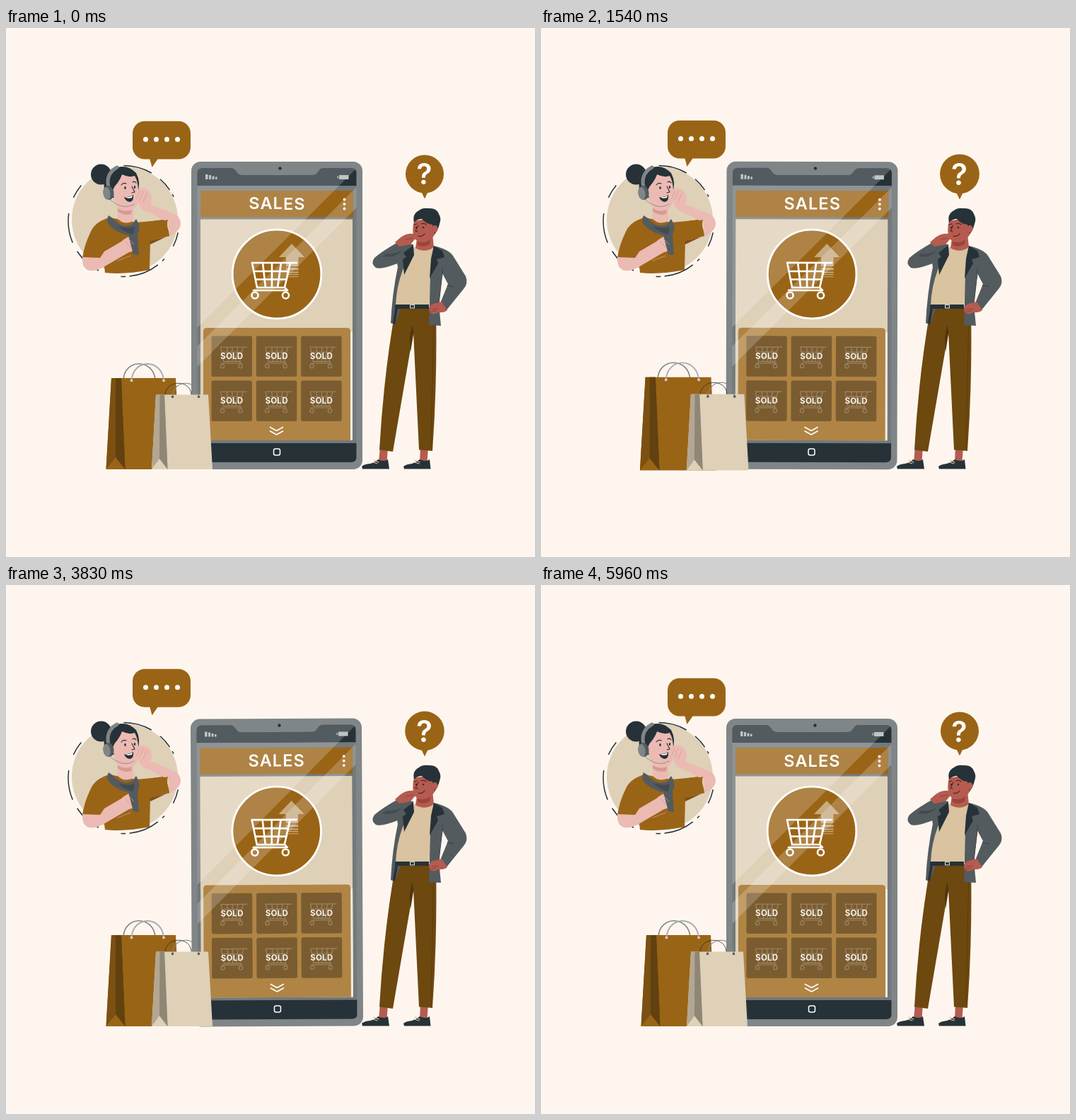
Write an HTML page that moves like this. It is 748 by 748 pixels and loops after 6000 ms.

```html
<!DOCTYPE html>
<html lang="en">
<head>
<meta charset="utf-8">
<title>Sales</title>
<style>
html, body { margin: 0; width: 100%; height: 100%; overflow: hidden; background: #fef6ee; }
svg { display: block; width: 100vw; height: 100vh; }
text { font-family: Inter, "Open Sans", sans-serif; font-weight: 600; fill: #fff; text-anchor: middle; }
.brown { fill: #9a6416; }
.dark { fill: #263238; }
.grey { fill: #535b5f; }
.beige { fill: #dfd0b8; }
.pink { fill: #ebbab3; }
.skin { fill: #b55b50; }
.line { fill: none; stroke-linecap: round; stroke-linejoin: round; }
</style>
</head>
<body>
<svg viewBox="0 0 748 748">
  <defs>
    <g id="cart" class="line">
      <path d="M411 332H348L355 367H394L402 332M350.500 344H399M353 355.500H397M363 332L367 367M376 332V367M389 332L384 367M394 367L398 371H350"/>
      <circle cx="352" cy="378" r="4.500"/><circle cx="395.500" cy="378" r="4.500"/>
    </g>
  </defs>

  <!-- phone -->
  <g id="phone">
    <rect x="262" y="189" width="242" height="435" rx="13" fill="#808587"/>
    <path class="dark" d="M278 198H318Q322 198 325 202L328 206Q330 208 334 208H433Q437 208 439 206L443 201Q445 198 449 198H488Q495.500 198 495.500 205V223H270.500V205Q270.500 198 278 198Z"/>
    <circle class="dark" cx="387.500" cy="198.500" r="2.200"/>
    <path d="M270.500 223H495.500V587H270.500Z" fill="#73797c"/>
    <path class="brown" d="M275 230H491V267.500H275Z"/>
    <path class="beige" d="M275 270.500H490V583H275Z"/>
    <circle class="brown" cx="383" cy="348" r="62.800" stroke="#fff" stroke-width="2.800"/>
    <path d="M404 305L422 324H413.500V337H396V324H386ZM396 339H413.500V342.500H396ZM396 344.500H413.500V346.500H396ZM396 348H413.500V349.300H396ZM396 351.300H413.500V352.300H396Z" fill="#dfd0b8" opacity=".65"/>
    <use href="#cart" stroke="#fff" stroke-width="2.600"/>
    <path d="M487 430H490V583H487Z" fill="#f3ece1"/>
    <path d="M279 583V429Q279 424 284 424H482Q487 424 487 429V583Z" fill="#b08444"/>
    <g id="cards"></g>
    <path class="line" d="M373.500 564.500L382.500 569.500L391.500 564.500M373.500 570L382.500 575L391.500 570" stroke="#fff" stroke-width="1.700"/>
    <path class="dark" d="M270.500 587H495.500V607Q495.500 614 488 614H278Q270.500 614 270.500 607Z"/>
    <rect x="378.500" y="595" width="9" height="9" rx="2.500" fill="none" stroke="#fff" stroke-width="1.500"/>
    <path d="M270.500 205Q270.500 198 278 198H318Q322 198 325 202L328 206Q330 208 334 208H433Q437 208 439 206L443 201Q445 198 449 198H488Q492 198 494 200L270.500 423.500ZM495.500 225V254L270.500 479V450Z" fill="#fff" opacity=".2"/>
    <path d="M282 207H285.500V214H282ZM287 208H290V214H287ZM291.500 209.500H294.500V214H291.500ZM296 210.500H298.500V214H296ZM471 208H484.500V214H471ZM468.500 209.500H470V212.500H468.500Z" fill="#c1c4c5"/>
    <text x="383.500" y="256.500" font-size="23.500" letter-spacing="1.100">SALES</text>
    <g fill="#fff"><circle cx="478.500" cy="242.500" r="1.900"/><circle cx="478.500" cy="249" r="1.900"/><circle cx="478.500" cy="255.500" r="1.900"/></g>
  </g>

  <!-- bags -->
  <g id="bags">
    <path class="line" d="M166 498C167 467 209 467 211 498" stroke="#808587" stroke-width="1.600"/>
    <path class="brown" d="M149 495H240L247 624H141.500Z"/>
    <path d="M149 495H163L168.500 624L155 607L141.500 624Z" fill="#7b5012"/>
    <path d="M155 495H163L168.500 624L155 607Z" fill="#61410f"/>
    <path class="line" d="M177.500 499C179 467 221 467 223 499" stroke="#a6abad" stroke-width="1.800"/>
    <circle cx="177.500" cy="498.500" r="2" fill="#c9cbcc"/><circle cx="223" cy="498.500" r="2" fill="#c9cbcc"/>
    <path class="line" d="M225 518C227 497 261 497 262 518" stroke="#263238" stroke-width=".8"/>
    <path class="beige" d="M212 518.500H286L292 624H206Z"/>
    <path d="M212 518.500H224L228.500 624L217 609L206 624Z" fill="#b3a793"/>
    <path d="M217.500 518.500H224L228.500 624L217 609Z" fill="#8f8675"/>
    <path class="line" d="M235.500 521C237 496 271 496 272.500 521" stroke="#808587" stroke-width="1.100"/>
    <circle class="grey" cx="235.500" cy="521.500" r="1.800"/><circle class="grey" cx="272.500" cy="521.500" r="1.800"/>
  </g>

  <!-- agent -->
  <g>
    <circle class="beige" cx="168" cy="271" r="75"/>
    <circle cx="166.500" cy="273" r="78.500" fill="none" stroke="#263238" stroke-width="1.500" pathLength="360" stroke-dasharray="0 12 15 16 3 6 32 4 5 24 30 10 31 17 15 50 30 11 15 5 3 26"/>
    <path class="brown" d="M146 268Q125 274 119 290Q111 306 108 325L138 329L140 346Q168 349 203 342L204 300L231 294Q226 278 229 271L184 275Z"/>
    <path class="pink" d="M203 295Q234 299 244 285Q251 276 242 265L204 249Q209 238 202 231Q194 224 189 227L187 245Q189 257 200 260L224 272L229 271L232 293Z"/>
    <path class="brown" d="M186 276L222 271Q230 281 231 294L204 301L190 296Z"/>
    <path d="M203 301L226 295.500L204 306Z" fill="#7d5011"/>
    <path class="pink" d="M108 324Q107 338 115 342Q123 346 138 338L174 317Q184 315 186 306Q187 296 179 294Q172 294 163 302L139 316L133 325Z"/>
    <path class="pink" d="M157 244L158 270Q168 280 181 272L179 253Z"/>
    <path d="M158 255Q167 261 178 257L177 263Q166 266 158 259Z" fill="#d79a93"/>
    <path class="grey" d="M145 265Q140 274 148 281Q160 291 173 293L180 320L188 321L186 292Q192 282 184 270L178 278Q164 284 151 269Z"/>
    <path d="M158 280Q173 285 182 281L180 292Q169 290 158 280Z" fill="#434b50"/>
    <circle class="dark" cx="134.500" cy="207" r="14.500"/>
    <path class="dark" d="M142 240Q132 212 151 200Q169 190 184 205Q191 218 186 233L160 240Z"/>
    <path class="pink" d="M151 230Q156 216 164 207Q174 212 182 209Q188 219 187 238Q188 253 177 257Q158 260 153 242Z"/>
    <path class="dark" d="M148 229Q159 221 165 205L159 199L146 211Z"/>
    <path class="line" d="M146 229Q139 207 157 197" stroke="#808587" stroke-width="5"/>
    <ellipse class="grey" cx="145" cy="233" rx="7.500" ry="10" transform="rotate(-9 145 233)"/>
    <ellipse cx="142.500" cy="234" rx="5" ry="9" fill="#808587" transform="rotate(-9 142 234)"/>
    <path class="line" d="M163 222Q166 218 170 220M179 218Q182 216 184 219M178 224L182 232L178 233" stroke="#263238" stroke-width="1.100"/>
    <ellipse class="dark" cx="168.500" cy="226" rx="1.300" ry="2"/><ellipse class="dark" cx="182" cy="225" rx="1.200" ry="2"/>
    <path class="dark" d="M167 239Q174 240 180 236Q181 245 175 246Q169 245 167 239Z"/>
    <path d="M168 239Q174 240 179 237L178 240Q172 242 168 239Z" fill="#fff"/>
    <path class="pink" d="M187 229Q192 224 198 230Q205 239 202 246L188 248Z"/>
    <path class="line" d="M189 231L185 241M194 231L189 243M199 234L194 246M173 298L181 306M169 302L176 310M158 329L176 322" stroke="#d79a93" stroke-width=".8"/>
    <path class="line" d="M145 241Q165 259 181 249" stroke="#808587" stroke-width=".8"/>
  </g>
  <g id="chat">
    <rect class="brown" x="179" y="131.700" width="82" height="53.800" rx="17"/>
    <path class="brown" d="M203 184L206.500 197L215.500 184Z"/>
    <g fill="#fff"><circle cx="197.500" cy="157.500" r="3.500"/><circle cx="212.500" cy="157.500" r="3.500"/><circle cx="227.500" cy="157.500" r="3.500"/><circle cx="242.500" cy="157.500" r="3.500"/></g>
  </g>

  <!-- customer -->
  <g>
    <path class="skin" d="M529 592H540L538.500 614H527ZM586 592H597L595.500 614H585Z"/>
    <path class="dark" d="M503 620Q506 617 515 616Q522 614 526 610Q535 614 540 610L542 623.500H504ZM562 620Q565 617 574 616Q580 614 585 610Q594 614 599 610L600.500 623.500H563Z"/>
    <path class="line" d="M520 611L527 614M519 614L525 616M578 611L585 614M577 614L584 616" stroke="#d9c3a0" stroke-width="1.200"/>
    <path d="M551 395H608Q610 500 603 598L584 596.500L576 430L547 599L528 596.500Q534 490 551 395Z" fill="#6d480f"/>
    <path d="M574 420L576.500 430L572 458L571 438Z" fill="#513509"/>
    <path class="line" d="M605 400L601 594" stroke="#5c3c0b" stroke-width="1"/>
    <path class="grey" d="M572 308Q558 309 551 321L554 338Q546 375 544 417L550 420L576 345Z"/>
    <path class="dark" d="M551 392L547 417L550 420L555 390Z"/>
    <path d="M577 310H606L602 345L598 392H551Q552 366 561 342Z" fill="#d9c3a0"/>
    <path class="skin" d="M582 291H603L605 310Q592 319 579 311Z"/>
    <path d="M582 302Q592 304 600 298L599 306Q590 311 582 307Z" fill="#9a443d"/>
    <path class="dark" d="M550.500 391H598V397H550Z"/>
    <rect x="571.500" y="391.700" width="6" height="4.200" fill="none" stroke="#e7e2da" stroke-width="1"/>
    <path class="grey" d="M605 308Q626 313 632 322L650 351Q654 361 647 369L622 400L614 389L625 362L617 347L612 390L615 421L598 420L600 350Z"/>
    <path class="dark" d="M605 308L617 315L620 324L609 327L611 333L599 354L601 326Z"/>
    <path class="line" d="M617 347L617 339M612 390L617 347M624 364L633 366" stroke="#3b4448" stroke-width="1"/>
    <path class="skin" d="M598 396Q600 390 609 389L616 387L624 399Q619 403 611 402Q603 407 599 402Z"/>
    <path class="grey" d="M576 306L554 303Q531 316 521 325Q515 333 523 339Q531 342 556 332L575 317Z"/>
    <path class="dark" d="M576 307L562 318L566 324L561 327L563 349L577 321Z"/>
    <path d="M538 319Q550 321 560 314Q552 326 533 323Z" fill="#434b50"/>
    <path class="skin" d="M550 303L558 296Q566 290 577 291Q583 295 577 300L572 306L556 309Z"/>
    <path class="skin" d="M577 273Q573 288 578 298Q584 305 595 302Q605 297 609 287Q613 279 608 274L599 269Z"/>
    <path class="dark" d="M577 275Q574 263 584 258Q589 254 597 255Q609 254 612 263Q616 269 613 277Q611 286 606 291Q604 282 603 278Q594 277 588 270Q582 270 577 275Z"/>
    <ellipse class="skin" cx="606.500" cy="284" rx="4" ry="5"/>
    <path class="line" d="M577 278L581 277M587 277Q591 275 594 278M583 279L579 287L582 288M583 294Q588 296 592 291" stroke="#4e211f" stroke-width="1.100"/>
    <circle class="dark" cx="580" cy="282" r="1.200"/><circle class="dark" cx="590" cy="282" r="1.300"/>
    <path class="line" d="M565 299L575 297M602 398L611 397M600 402L608 400" stroke="#8f3f39" stroke-width=".9"/>
  </g>
  <g id="question">
    <circle class="brown" cx="592" cy="206.500" r="27"/>
    <path class="brown" d="M586.500 230L592 241.500L597.500 230Z"/>
    <text x="591.500" y="221.500" font-size="41">?</text>
  </g>
</svg>
<script>
const get = id => document.getElementById(id);
const move = (id, value) => get(id).setAttribute('transform', value);

let cards = '';
for (let row = 0; row < 2; row++) {
  for (let col = 0; col < 3; col++) {
    cards += `<g transform="translate(${col * 63.3} ${row * 63})">
      <rect x="290.500" y="435.500" width="57.500" height="57.500" rx="2.500" fill="#7b5c30"/>
      <use href="#cart" transform="translate(100 257) scale(.585)" stroke="#9d8663" stroke-width="2"/>
      <text x="319.300" y="468" font-size="11.600" letter-spacing=".25">SOLD</text></g>`;
  }
}
get('cards').innerHTML = cards;

// Linear interpolation through [phase, value] pairs.
function track(phase, keys) {
  const i = keys.findIndex(key => phase < key[0]);
  const [p0, v0] = keys[i - 1], [p1, v1] = keys[i];
  return v0 + (v1 - v0) * (phase - p0) / (p1 - p0);
}
const floatKeys = [[0, 0], [.5, -14.96], [1, 0]];
const windKeys = [[0, 0], [.25, 1], [.75, -1], [1, 0]];
const beatKeys = [[0, 1], [.1, 1.1], [.3, 1], [.4, 1], [.5, 1.1], [.6, 1], [1, 1]];
const zoom = (scale, x, y) => `translate(${x} ${y}) scale(${scale}) translate(${-x} ${-y})`;

// The motion ends after 5960 ms and rests until the loop restarts.
function draw(now) {
  const turn = Math.min(1, now % 6000 / 5960);
  const slow = turn % 1, fast = turn * 4 % 1;
  move('chat', `translate(0 ${track(fast, floatKeys)})`);
  move('phone', `rotate(${track(fast, windKeys)} 383 406.5)`);
  move('bags', zoom(track(slow, beatKeys), 217, 549.5));
  move('question', zoom(track(fast, beatKeys), 592, 210.5));
}
const start = performance.now();
function tick() {
  draw(performance.now() - start);
  requestAnimationFrame(tick);
}
tick();
</script>
</body>
</html>
```
